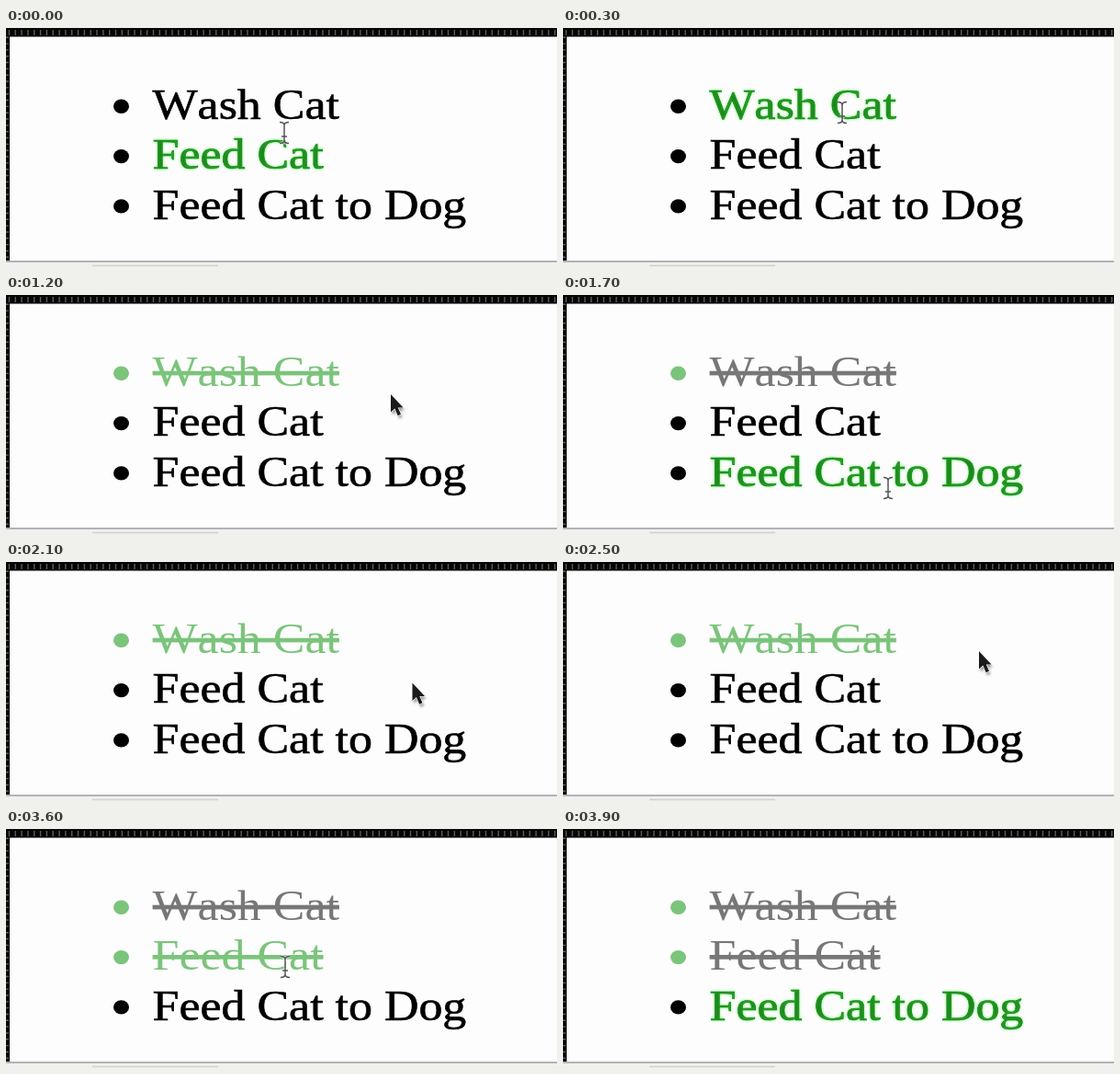
An HTML page for the animation above (4 s loop, 600 px wide and 260 px high).

```html
<!DOCTYPE html>
<html lang="en">
<head>
<meta charset="utf-8">
<title>To-do list</title>
<style>
  html, body { margin: 0; width: 100%; height: 100%; overflow: hidden; background: #fefdfe; }
  svg { display: block; width: 600px; height: 260px; }
  text {
    font: 47.2px "Liberation Serif", "Times New Roman", serif;
    font-kerning: none;
    stroke-width: .6px;
    text-decoration-thickness: 2.4px;
  }
  .hover { text-shadow: 0 0 3px #7f7; }
  .done { text-decoration-line: line-through; }
</style>
</head>
<body>
<svg viewBox="0 0 600 260">
  <defs>
    <filter id="soft" x="-50%" y="-50%" width="200%" height="200%"><feGaussianBlur stdDeviation="1.6"/></filter>
    <path id="tip" d="M0 0V19.5L4.4 15.6L7.6 23.2L11 21.8L7.8 14.4H13.6Z"/>
    <path id="bar" d="M-5 -11.5Q0 -11.5 0 -8Q0 -11.5 5 -11.5M0 -8V8M-5 11.5Q0 11.5 0 8Q0 11.5 5 11.5M-3 4H3" fill="none"/>
  </defs>
  <rect width="600" height="260" fill="#fefdfe"/>
  <rect y="254" width="600" height="6" fill="#f1f0f1"/>
  <rect y="253" width="600" height="2" fill="#b4b3b4"/>
  <path d="M94 258.5H231" stroke="#d2d1d2" stroke-width="1.5"/>
  <rect width="600" height="9.5" fill="#050505"/>
  <rect width="4" height="253" fill="#050505"/>
  <path id="marks" stroke="#5c5c5c" stroke-width="1.4"/>
  <g id="list" transform="scale(1.1 1)"></g>
  <g id="beam">
    <use href="#bar" stroke="#fff" stroke-opacity=".6" stroke-width="3.5"/>
    <use href="#bar" stroke="#555" stroke-width="1.5"/>
  </g>
  <g id="arrow">
    <use href="#tip" x="1.5" y="3" opacity=".45" filter="url(#soft)"/>
    <use href="#tip" fill="#1b1b1b" stroke="#fff" stroke-width="1.4" paint-order="stroke"/>
  </g>
</svg>
<script>
const LOOP = 4000, STEP = 100, HIDE = 3800;
const STRETCH = 1.1, LEFT = 160, TOP = 56, PITCH = 54.3, TICK = 6.83;
const GREEN = '#127d12', PALE = '#7bc47b', GRAY = '#777';
const $ = id => document.getElementById(id);

function make(tag, attrs, parent) {
  const el = document.createElementNS('http://www.w3.org/2000/svg', tag);
  for (const k in attrs) el.setAttribute(k, attrs[k]);
  parent.append(el);
  return el;
}

// Ruler marks along the top and left edges
let marks = '';
for (let p = TICK / 2; p < 600; p += TICK) {
  marks += `M${p} 2V8`;
  if (p > 10 && p < 252) marks += `M0 ${p}H3`;
}
$('marks').setAttribute('d', marks);

const tasks = [
  { label: 'Wash Cat', doneAt: 1000 },
  { label: 'Feed Cat', doneAt: 3600 },
  { label: 'Feed Cat to Dog', doneAt: Infinity }
];
const rows = tasks.map(({ label, doneAt }, i) => {
  const y = TOP + 43 + i * PITCH;
  const dot = make('circle', { cx: 114.1, cy: y - 13.7, r: 7.7 }, $('list'));
  const text = make('text', { x: (LEFT - .4) / STRETCH, y }, $('list'));
  text.textContent = label;
  return { dot, text, doneAt, right: LEFT + text.getComputedTextLength() * STRETCH };
});

// Pointer stops: time, x, y
const stops = [
  [0, 303, 114], [300, 304, 92], [800, 286, 93], [1000, 288, 93], [1200, 419, 108],
  [1300, 419, 108], [1500, 512, 160], [1700, 354, 210], [1900, 310, 148],
  [2300, 575, 115], [2500, 453, 97], [3200, 417, 78], [3500, 310, 140], [HIDE, 292, 170]
];

function pointer(t) {
  const i = stops.findLastIndex(s => s[0] <= t);
  const a = stops[i], b = stops[i + 1];
  if (!b) return a.slice(1);
  const f = (t - a[0]) / (b[0] - a[0]);
  return [a[1] + (b[1] - a[1]) * f, a[2] + (b[2] - a[2]) * f];
}

// Row whose text lies under the point, or -1
function rowAt(x, y) {
  const i = Math.floor((y - TOP) / PITCH);
  return rows[i] && x < rows[i].right ? i : -1;
}

function draw(t) {
  const [x, y] = pointer(t), hover = rowAt(x, y);
  rows.forEach(({ dot, text, doneAt }, i) => {
    const done = t >= doneAt, over = hover === i;
    const color = done ? (over || hover < 0 ? PALE : GRAY) : over ? GREEN : '#000';
    dot.setAttribute('fill', done ? PALE : '#000');
    text.setAttribute('fill', color);
    text.setAttribute('stroke', done ? 'none' : color);
    text.setAttribute('class', done ? 'done' : over ? 'hover' : '');
  });
  for (const [id, on] of [['beam', hover >= 0], ['arrow', hover < 0]]) {
    $(id).setAttribute('transform', `translate(${x} ${y})`);
    $(id).setAttribute('visibility', on && t < HIDE ? 'visible' : 'hidden');
  }
}

const start = performance.now();
function tick() {
  const t = (performance.now() - start) % LOOP;
  draw(Math.floor(t / STEP) * STEP);
  requestAnimationFrame(tick);
}
tick();
</script>
</body>
</html>
```
